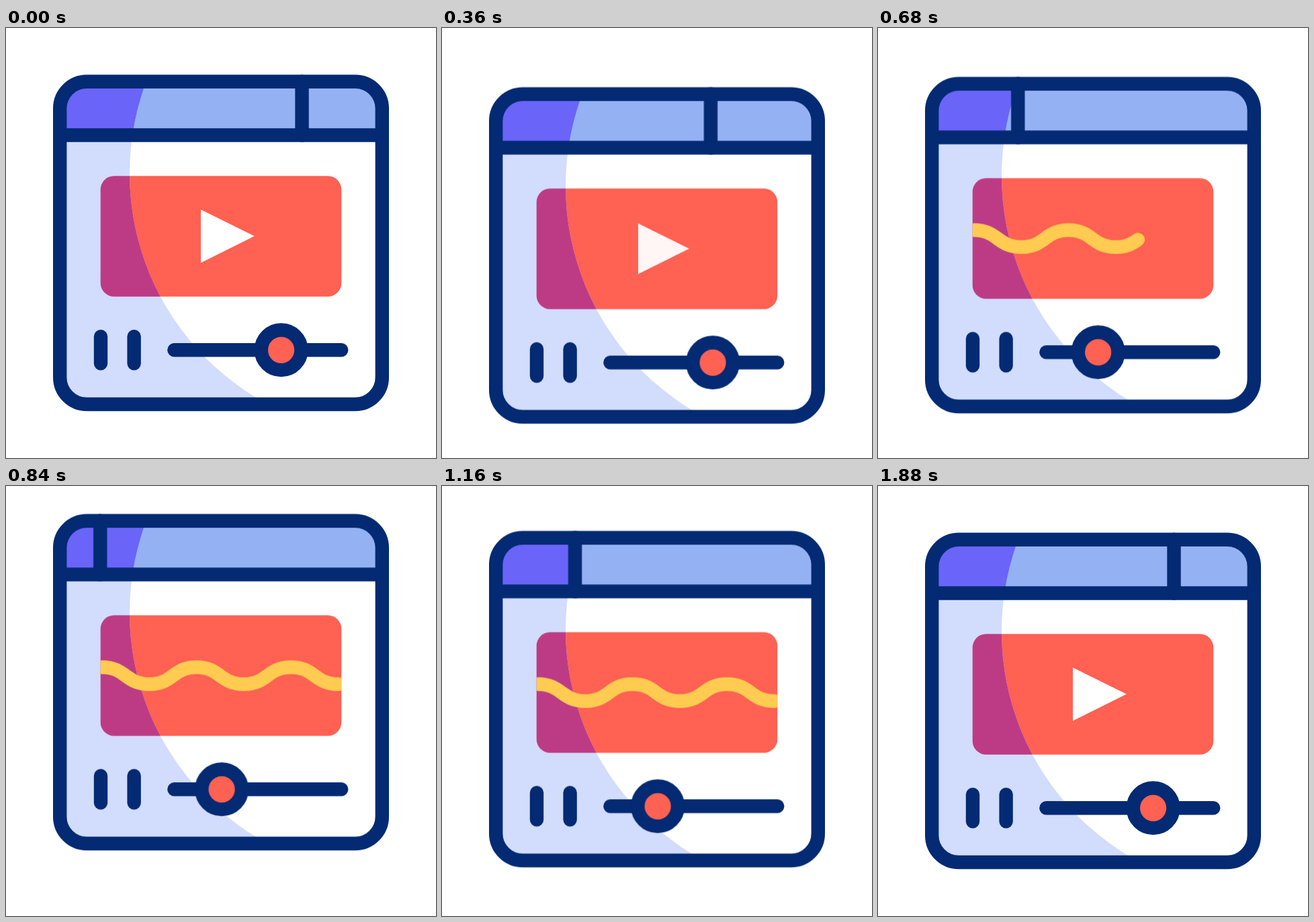
Write an HTML page without scripts that moves like this. It is 640 px wide and 640 px high and loops after 2000 ms.

```html
<!DOCTYPE html>
<html lang="en">
<head>
<meta charset="utf-8">
<title>Media player</title>
<style>
  html, body { margin: 0; width: 100%; height: 100%; overflow: hidden; background: #fff; }
  svg { display: block; width: 100vw; height: 100vh; }

  .line { fill: none; stroke: #032a73; stroke-width: 20.4; stroke-linecap: round; }
  .wave { fill: none; stroke: #ffcb50; stroke-width: 20.4; stroke-linecap: round; stroke-dasharray: 1 2; }
  .bars path { vector-effect: non-scaling-stroke; }
  .bars { transform-origin: 0 487.8px; }
  .play { transform-origin: 330px 309.8px; }

  .window, .divider, .knob, .bars, .wave, .play {
    animation: 2s cubic-bezier(.33, 0, .67, 1) infinite;
  }
  .window  { animation-name: bob; }
  .divider { animation-name: divide; }
  .knob    { animation-name: seek; }
  .bars path { animation: squeeze 2s cubic-bezier(.33, 0, .67, 1) infinite; transform-origin: 0 487.8px; }
  .wave    { animation-name: draw; }
  .play    { animation-name: pulse, fade; }

  @keyframes bob {
    0%, 9.3% { transform: translateY(0); }
    25.4% { transform: translateY(33px); }
    43.1% { transform: translateY(-28.5px); }
    61.5%, 100% { transform: translateY(0); }
  }
  @keyframes divide {
    0%, 10% { transform: translateX(0); }
    45.6% { transform: translateX(-309px); }
    87.3%, 100% { transform: translateX(0); }
  }
  @keyframes seek {
    0%, 14.1% { transform: translateX(0); }
    38%, 58% { transform: translateX(-88.5px); }
    81.5%, 100% { transform: translateX(0); }
  }
  @keyframes squeeze {
    0%, 64% { transform: scaleY(1); }
    72% { transform: scaleY(.6); }
    80%, 100% { transform: scaleY(1); }
  }
  @keyframes draw {
    0%, 20% { stroke-dashoffset: 1.03; }
    42%, 65.4% { stroke-dashoffset: 0; }
    91.5%, 100% { stroke-dashoffset: -1.03; }
  }
  @keyframes pulse {
    0%, 6% { transform: scale(1); }
    14% { transform: scale(.9); }
    22%, 100% { transform: scale(1); }
  }
  @keyframes fade {
    0%, 15.5% { opacity: 1; }
    33.5%, 77% { opacity: 0; }
    93.5%, 100% { opacity: 1; }
  }
</style>
</head>
<body>
<svg viewBox="0 0 640 640">
  <defs>
    <rect id="frame" x="80.2" y="79.8" width="479.6" height="480.2" rx="40"/>
    <rect id="panel" x="140.7" y="220.3" width="358.5" height="179.4" rx="20"/>
    <path id="head" d="M80.2 159.5V119.8a40 40 0 0 1 40-40H519.8a40 40 0 0 1 40 40V159.5Z"/>
    <clipPath id="shade"><path d="M574-173.6A390 390 0 0 0 574 606.4H60V-173.6Z"/></clipPath>
    <clipPath id="screen"><use href="#panel"/></clipPath>
  </defs>

  <g class="window">
    <use href="#frame" fill="#fff"/>
    <use href="#head" fill="#93b1f3"/>
    <use href="#panel" fill="#ff6152"/>
    <g clip-path="url(#shade)">
      <use href="#frame" fill="#d2dcfd"/>
      <use href="#head" fill="#6a64f8"/>
      <use href="#panel" fill="#bd3b85"/>
    </g>

    <path class="play" d="M290 270.2L369.8 309.8L290 349.5Z" fill="#fff"/>
    <g clip-path="url(#screen)">
      <path class="wave" pathLength="1" d="M143 297.5c35 0 35 25.3 70.3 25.3s35-25.3 70.3-25.3s35 25.3 70.3 25.3s35-25.3 70.3-25.3s35 25.3 70.3 25.3"/>
    </g>

    <path class="line divider" d="M440.5 79.8V159.5"/>
    <path class="line" d="M80.2 159.5H559.8"/>
    <use href="#frame" class="line"/>

    <g class="bars">
      <path class="line" d="M141 459.3V499.2"/>
      <path class="line" d="M190.6 459.3V499.2"/>
    </g>
    <path class="line" d="M250.4 479.3H499.2"/>
    <circle class="line knob" cx="409.6" cy="479.3" r="29.8" style="fill:#ff6152"/>
  </g>
</svg>
</body>
</html>
```
